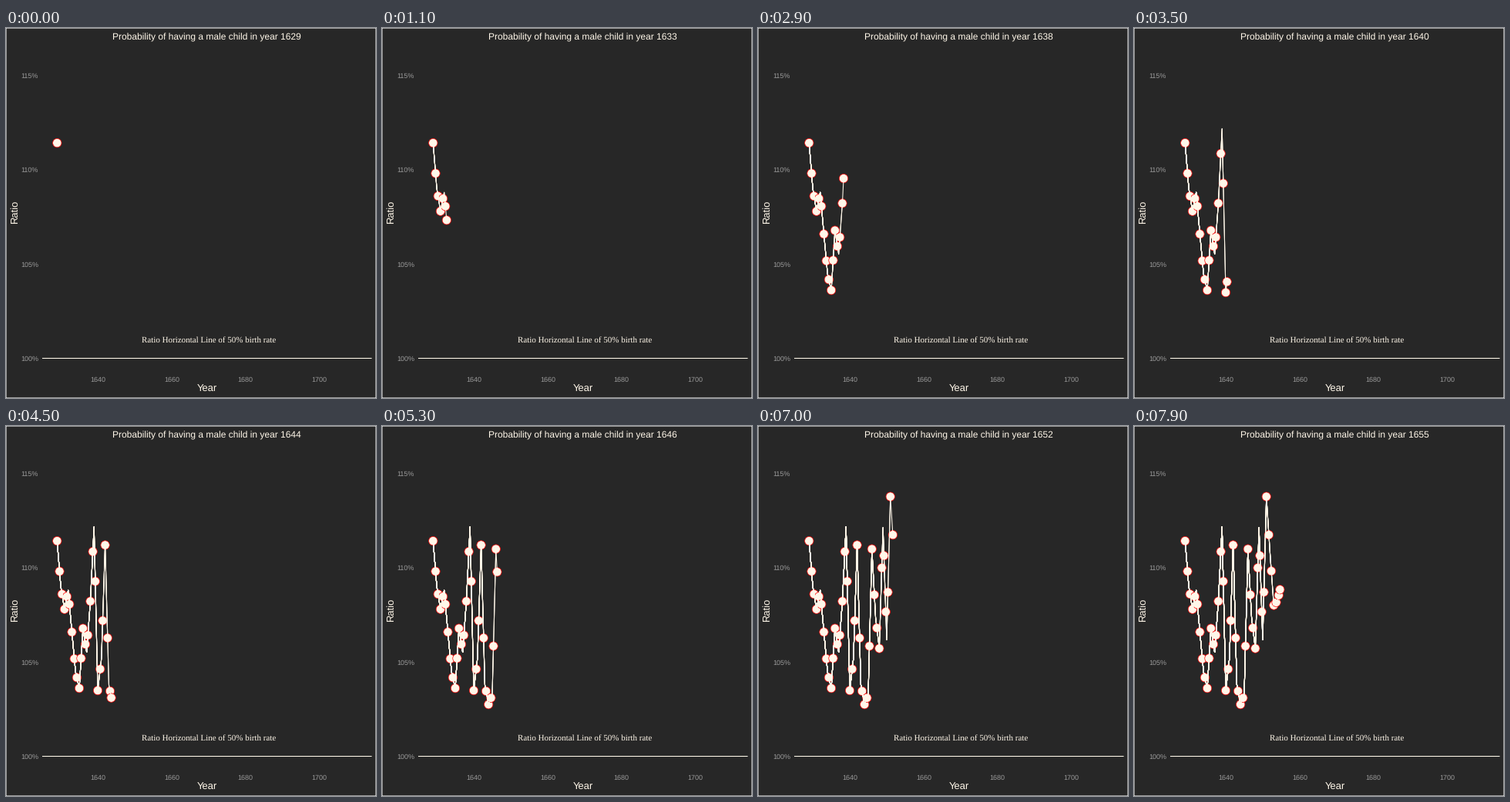
Recreate the animation shown at these times as a matplotlib script. Size 480 by 480 pixels, loop 8 s.

```python
import numpy as np
import matplotlib.pyplot as plt
from matplotlib.animation import FuncAnimation
from matplotlib.patches import Circle, Rectangle

SIZE, DPI = 480, 80
PX = 72 / DPI                       # one pixel in points
FRAMES, INTERVAL = 80, 100
FIRST, SPAN, STEPS = 1629, 81, 249  # the full reveal covers 81 years in 249 steps
TRAIL = 2                           # a marker stays behind every second step

BG, CREAM, GREY, RED = "#272727", "#fff7e9", "#999999", "#ff0000"

# Key points of the curve: percent above parity, one per year.
excess = np.array([11.42, 9.0, 7.8, 8.8, 6.59, 4.46, 3.61, 6.78, 5.52,
                   8.22, 12.17, 3.49, 5.19, 11.2, 3.81, 2.75, 3.27, 10.99,
                   7.35, 5.72, 12.13, 6.17, 13.77, 10.73, 8.01, 8.24, 9.14])


def to_x(year):
    return 66.3 + (year - FIRST) * 4.793


def to_y(percent):
    return 428.5 - (percent - 100) * 24.465


age = np.arange(len(excess))
xs, ys = to_x(FIRST + age), to_y(100 + excess)
keys = np.round(age * STEPS / SPAN)  # each year snaps to a whole step


def head(i):
    return np.interp(i, keys, xs), np.interp(i, keys, ys)


def path(i):
    past = keys < i
    hx, hy = head(i)
    return np.append(xs[past], hx), np.append(ys[past], hy)


plt.rcParams["text.hinting"] = "none"
fig = plt.figure(figsize=(SIZE / DPI, SIZE / DPI), dpi=DPI, facecolor=BG)
ax = fig.add_axes([0, 0, 1, 1])
ax.set_xlim(0, SIZE)
ax.set_ylim(SIZE, 0)
ax.axis("off")


def label(x, y, text, size, color=CREAM, ha="center", font="Liberation Sans", angle=0):
    return ax.text(x, y, text, fontsize=size * PX, color=color, ha=ha,
                   va="baseline", family=font, rotation=angle,
                   rotation_mode="anchor")


def line(x, y):
    return ax.plot(x, y, color=CREAM, lw=1.07 * PX, solid_capstyle="butt",
                   solid_joinstyle="round", snap=False, zorder=3)[0]


def dot(x, y):
    return ax.add_patch(Circle((x, y), 5.69, fc=CREAM, ec=RED, lw=0.71 * PX,
                               snap=False, zorder=2))


ax.add_patch(Rectangle((0, 0), SIZE, SIZE, fc="none", ec="white",
                       lw=1.07 * PX, snap=False))
line([47, 474.5], [428.5, 428.5])

for year in range(1640, 1701, 20):
    label(to_x(year), 459, str(year), 9, GREY)
for pct in range(100, 116, 5):
    label(42, to_y(pct) + 3.5, f"{pct}%", 9, GREY, ha="right")

title = label(260.5, 16, "", 12)
label(260.5, 472, "Year", 13)
label(15, 238, "Ratio", 13, angle=90)
label(263, 408, "Ratio Horizontal Line of 50% birth rate", 11.04,
      font="Liberation Serif")

# Past lines are drawn over one another, which thickens the older stretch.
steps = range(0, FRAMES, TRAIL)
old_lines = [line(*path(i)) for i in steps]
now_line = line([], [])
old_dots = [dot(*head(i)) for i in steps]
now_dot = dot(*head(0))


def update(i):
    for step, past_line, past_dot in zip(steps, old_lines, old_dots):
        past_line.set_visible(step < i)
        past_dot.set_visible(step < i)
    now_line.set_data(*path(i))
    now_dot.set_center(head(i))
    year = round(FIRST + i * SPAN / STEPS)
    title.set_text(f"Probability of having a male child in year {year}")
    return [*old_lines, now_line, *old_dots, now_dot, title]


anim = FuncAnimation(fig, update, frames=FRAMES, interval=INTERVAL,
                     repeat=True, repeat_delay=0, blit=False)
plt.show()
```
